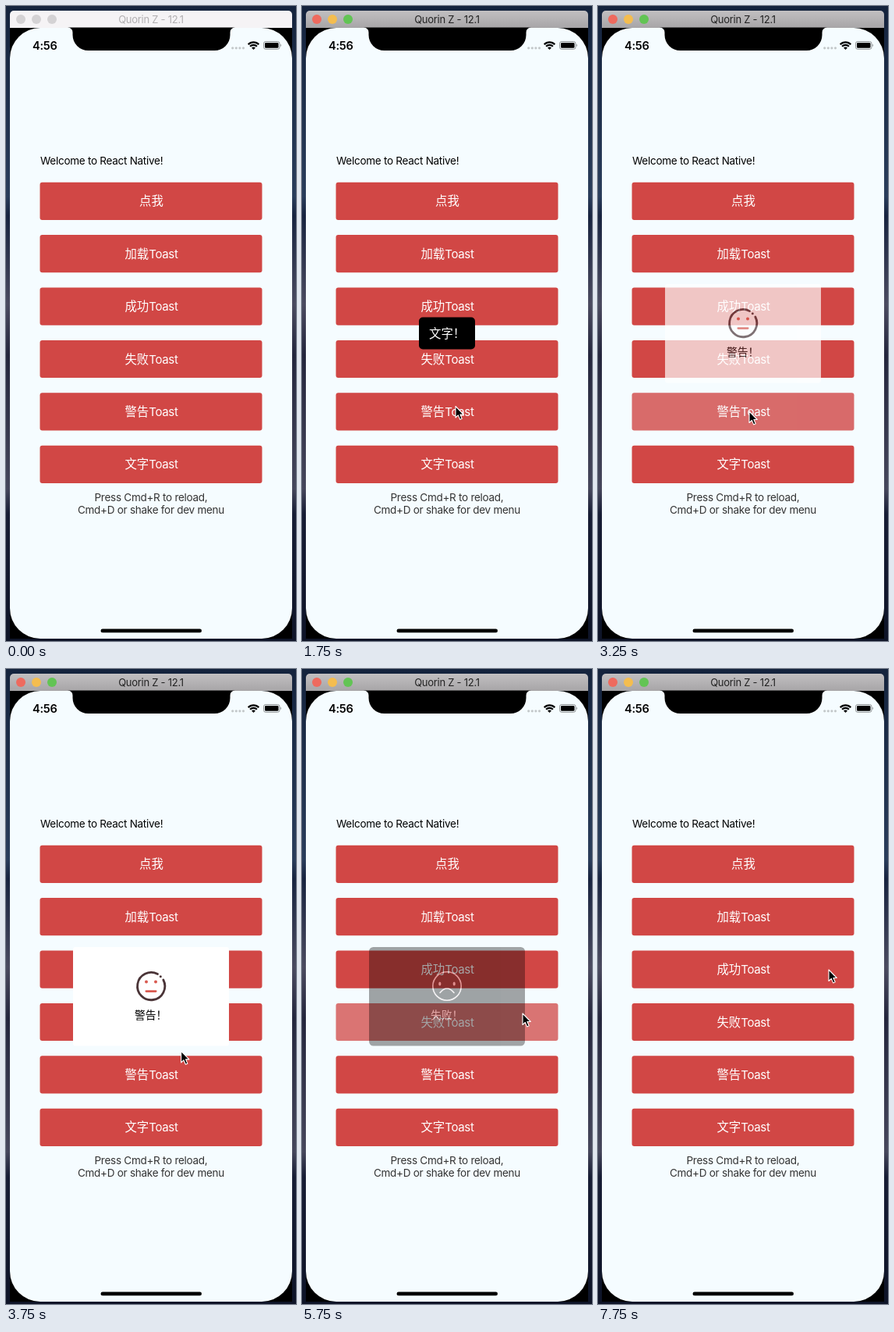
These frames come from a looping animation (372x813 px, 8000 ms). An HTML page:

```html
<!DOCTYPE html>
<html lang="zh-CN">
<head>
<meta charset="utf-8">
<title>Toast demo</title>
<style>
  html, body { margin: 0; width: 100%; height: 100%; overflow: hidden; background: #131c33; }
  svg { display: block; width: 372px; height: 813px; }
  text { font-family: Inter, "Noto Sans CJK SC", "Noto Sans CJK", sans-serif; font-size: 13.5px; letter-spacing: -.02em; }
  .cjk { font-family: "Noto Sans CJK SC", "Noto Sans CJK", sans-serif; letter-spacing: 0; }
  .mid { text-anchor: middle; }
</style>
</head>
<body>
<svg viewBox="0 0 372 813" lang="zh-CN">
  <defs>
    <linearGradient id="desk" x2="0" y2="1">
      <stop offset="0" stop-color="#14233d"/>
      <stop offset=".3" stop-color="#2a3d5b"/>
      <stop offset=".33" stop-color="#182440"/>
      <stop offset=".47" stop-color="#4b4b60"/>
      <stop offset=".55" stop-color="#24263d"/>
      <stop offset=".76" stop-color="#46475c"/>
      <stop offset=".8" stop-color="#171d35"/>
      <stop offset="1" stop-color="#0e1428"/>
    </linearGradient>
    <linearGradient id="bar" x2="0" y2="1">
      <stop offset="0" stop-color="#c1bfc1"/>
      <stop offset="1" stop-color="#a7a5a7"/>
    </linearGradient>
  </defs>

  <rect width="372" height="813" fill="url(#desk)"/>
  <rect x="5" y="28" width="362" height="782" fill="#000"/>
  <path id="titleBar" d="M5 28V11a5 5 0 0 1 5-5H362a5 5 0 0 1 5 5V28Z"/>
  <g id="lights"></g>
  <text id="title" class="mid" x="186" y="22" style="font-size:13px">Quorin Z - 12.1</text>

  <rect x="5" y="28" width="362" height="782" rx="39" fill="#f5fcff"/>
  <path d="M79 27.5Q85.500 28 85.500 34V37A20 20 0 0 0 105.500 57H267.500A20 20 0 0 0 287.500 37V34Q287.500 28 294 27.500Z"/>
  <text x="34" y="55.500" style="font-size:14.600px;font-weight:600">4:56</text>
  <g fill="#c3c8ca">
    <circle cx="290.700" cy="53.800" r="1.600"/><circle cx="295.300" cy="53.800" r="1.600"/>
    <circle cx="299.900" cy="53.800" r="1.600"/><circle cx="304.500" cy="53.800" r="1.600"/>
  </g>
  <g fill="none" stroke="#000" stroke-width="2.200">
    <path d="M310.700 49.200A9.600 9.600 0 0 1 324.300 49.200M313.100 51.700A6.200 6.200 0 0 1 321.900 51.700"/>
  </g>
  <path d="M317.500 56L315 53.400Q317.500 51.400 320 53.400Z"/>
  <rect x="330.500" y="45.500" width="20.500" height="9.800" rx="2.600" fill="none" stroke="#8d9193"/>
  <rect x="332" y="47" width="17.500" height="6.800" rx="1.400"/>
  <path d="M352.200 48.800Q354.200 50.400 352.200 52Z" fill="#8d9193"/>

  <text x="44" y="203">Welcome to React Native!</text>
  <g id="buttons"></g>
  <g fill="#333">
    <text class="mid" x="186" y="633.500">Press Cmd+R to reload,</text>
    <text class="mid" x="186" y="649.500">Cmd+D or shake for dev menu</text>
  </g>
  <rect x="121.500" y="797.500" width="129.500" height="4.800" rx="2.400"/>

  <g id="textToast">
    <rect x="150" y="398.500" width="72" height="41" rx="5"/>
    <text class="cjk" x="163" y="424.800" fill="#fff" style="font-size:15.400px">文字！</text>
  </g>

  <g id="warnToast">
    <rect x="86" y="356" width="200" height="126.500" rx="3" fill="#fff"/>
    <path d="M201.800 398A17.600 17.600 0 1 1 194.500 390.600" fill="none" stroke="#4a3437" stroke-width="2.800" stroke-linecap="round"/>
    <circle cx="198.300" cy="393.700" r="1.500" fill="#4a3437"/>
    <g fill="#d95a50">
      <circle cx="180" cy="400.500" r="2"/><circle cx="192" cy="400.500" r="2"/>
      <rect x="178.500" y="411.300" width="15" height="2.600" rx="1.300"/>
    </g>
    <text class="cjk" x="165" y="448.300" style="font-size:13.800px">警告！</text>
  </g>

  <g id="failToast">
    <rect x="86" y="356" width="200" height="126.500" rx="5.500" fill="#000" fill-opacity=".7"/>
    <g fill="none" stroke="#f3e9e9" stroke-width="1.600" stroke-linecap="round">
      <circle cx="186" cy="406" r="18.200"/>
      <path d="M177 414.500Q186 403.500 195 414.500"/>
    </g>
    <g fill="#f0d6d6">
      <ellipse cx="176.800" cy="403" rx="1.600" ry="2.500"/><ellipse cx="195.200" cy="403" rx="1.600" ry="2.500"/>
    </g>
    <text class="cjk" x="165" y="448.300" fill="#f0dede" style="font-size:13.800px">失败！</text>
  </g>

  <path id="cursor" d="M0 0V14.500L3.300 11.400L5.700 16.900L8.200 15.800L5.900 10.500H10.300Z" stroke="#fff" stroke-width="1.100" stroke-linejoin="round"/>
</svg>
<script>
  const LOOP = 8000, STEP = 250;
  const byId = id => document.getElementById(id);
  const labels = ['点我', '加载', '成功', '失败', '警告', '文字'];
  const lightColors = ['#ee6a5e', '#f4bd4f', '#62c454'];

  byId('buttons').innerHTML = labels.map((label, i) => {
    const y = 225.7 + i * 67.4;
    const latin = i ? '<tspan style="font-family:Inter,sans-serif;font-size:15px;letter-spacing:-.02em">Toast</tspan>' : '';
    return `<g><rect x="43.5" y="${y}" width="285" height="48.2" rx="3" fill="#d14745"/>
      <text class="cjk mid" x="186.500" y="${y + 29.6}" fill="#fff" style="font-size:15.400px">${label}${latin}</text></g>`;
  }).join('');
  byId('lights').innerHTML = lightColors.map((_, i) => `<circle cx="${19 + i * 20}" cy="17" r="6"/>`).join('');

  const buttons = [...byId('buttons').children];
  const lights = [...byId('lights').children];

  // Keys are [time, ...values]; values are interpolated linearly.
  const cursorPath = [[250, 210, 770], [500, 206, 640], [750, 204, 583], [1000, 202, 570], [1250, 199, 516],
    [1750, 197, 512.5], [2250, 194, 519], [3500, 194, 519], [4250, 286, 430], [5000, 286, 430],
    [5500, 283, 441], [5750, 283, 441], [6000, 290, 404], [6250, 293.5, 392], [6500, 296, 385]];
  const fades = {
    textToast: [[750, 0], [1000, .6], [1250, 1], [2500, 1], [2750, 0]],
    warnToast: [[3000, 0], [3250, .69], [3500, 1], [5000, 1], [5250, .3], [5500, 0]],
    failToast: [[5500, 0], [5750, .5], [6000, 1], [7250, 1], [7500, .4], [7750, 0]]
  };
  const presses = { 750: [5, .8], 3250: [4, .8], 5750: [3, .75] };

  function sample(keys, t) {
    const next = keys.findIndex(key => key[0] > t);
    if (next === 0) return keys[0].slice(1);
    if (next < 0) return keys[keys.length - 1].slice(1);
    const a = keys[next - 1], b = keys[next];
    const k = (t - a[0]) / (b[0] - a[0]);
    return a.slice(1).map((v, i) => v + (b[i + 1] - v) * k);
  }

  function draw(t) {
    const active = t >= 500;
    byId('titleBar').setAttribute('fill', active ? 'url(#bar)' : '#f5f3f5');
    byId('title').setAttribute('fill', active ? '#222' : '#b1afb1');
    lights.forEach((light, i) => light.setAttribute('fill', active ? lightColors[i] : '#d4d2d4'));

    const [pressed, opacity] = presses[t] || [-1, 1];
    buttons.forEach((button, i) => button.setAttribute('opacity', i === pressed ? opacity : 1));
    for (const id in fades) byId(id).setAttribute('opacity', sample(fades[id], t)[0]);

    const cursor = byId('cursor');
    cursor.setAttribute('visibility', t < 250 ? 'hidden' : 'visible');
    cursor.setAttribute('transform', `translate(${sample(cursorPath, t)})`);
  }

  const start = performance.now();
  function tick() {
    const t = (performance.now() - start) % LOOP;
    draw(Math.floor(t / STEP) * STEP);
    requestAnimationFrame(tick);
  }
  draw(0);
  requestAnimationFrame(tick);
</script>
</body>
</html>
```
